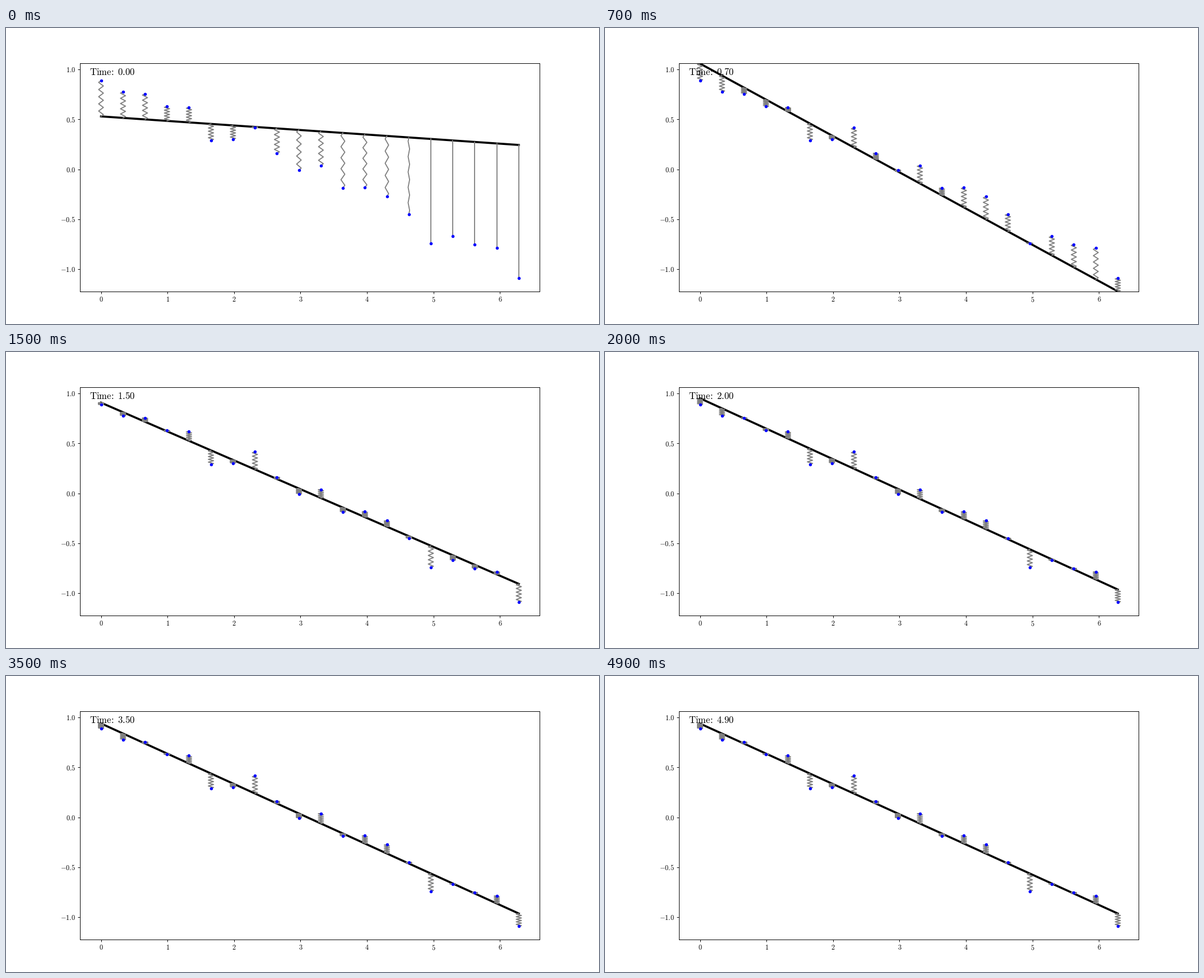
Write a matplotlib script that moves like this. It is 1058 px wide and 529 px high and loops after 5 s.

```python
import numpy as np
import matplotlib.pyplot as plt
from matplotlib.animation import FuncAnimation

plt.rcParams["mathtext.fontset"] = "cm"

FRAMES, STEP = 50, 0.1
NODES, WIDTH = 10, 0.08
DPI = 1058 / 12

xs = np.linspace(0, 2 * np.pi, 20)
ys = np.array([0.887, 0.775, 0.755, 0.627, 0.618, 0.291, 0.302, 0.415,
               0.162, -0.008, 0.039, -0.187, -0.182, -0.274, -0.449,
               -0.740, -0.670, -0.750, -0.785, -1.090])


def settle(t, start, rest, gamma, omega):
    """Damped oscillation released at rest from `start`."""
    swing = np.cos(omega * t) + gamma / omega * np.sin(omega * t)
    return rest + (start - rest) * np.exp(-gamma * t) * swing


def rod_at(t):
    """Heights of the rod above each data point."""
    mid = settle(t, 0.3862, -0.0128, 1.9, 3.8)
    tilt = settle(t, 0.1428, 0.9497, 2.0, 4.35)
    return mid + tilt * (1 - xs / np.pi)


def spring(x, y0, y1):
    """Zigzag of fixed wire length between two heights."""
    i = np.arange(1, NODES + 1)
    length = y1 - y0
    half = np.sqrt(max(0, WIDTH**2 - (length / NODES) ** 2)) / 2
    side = half * (-1.0) ** i * (1 if length < 0 else -1)
    px = np.concatenate([[x], x + side, [x]])
    py = np.concatenate([[y0], y0 + length * (2 * i - 1) / (2 * NODES), [y1]])
    return px, py


fig, ax = plt.subplots(figsize=(12, 6), dpi=DPI)
ax.set_xlim(-0.05 * 2 * np.pi, 1.05 * 2 * np.pi)
ax.set_ylim(-1.2216, 1.0578)
ax.set_xticks(range(7), [f"${v}$" for v in range(7)])
yticks = np.arange(-1, 1.1, 0.5)
ax.set_yticks(yticks, [f"${v:.1f}$" for v in yticks])

rod, = ax.plot([], [], color="black", lw=3)
coils = [ax.plot([], [], color="gray", lw=1.5)[0] for _ in xs]
ax.plot(xs, ys, "o", color="blue", ms=3.5)
label = ax.text(0.02, 0.95, "", fontsize=13.7, transform=ax.transAxes)


def update(n):
    t = n * STEP
    line = rod_at(t)
    rod.set_data(xs[[0, -1]], line[[0, -1]])
    for coil, x, y0, y1 in zip(coils, xs, line, ys):
        coil.set_data(*spring(x, y0, y1))
    label.set_text(r"$\mathrm{Time\hspace{-0.2}:\hspace{0.306}%.2f}$" % t)
    return [rod, *coils, label]


anim = FuncAnimation(fig, update, frames=FRAMES, interval=1000 * STEP,
                     repeat=True, repeat_delay=0)
plt.show()
```
